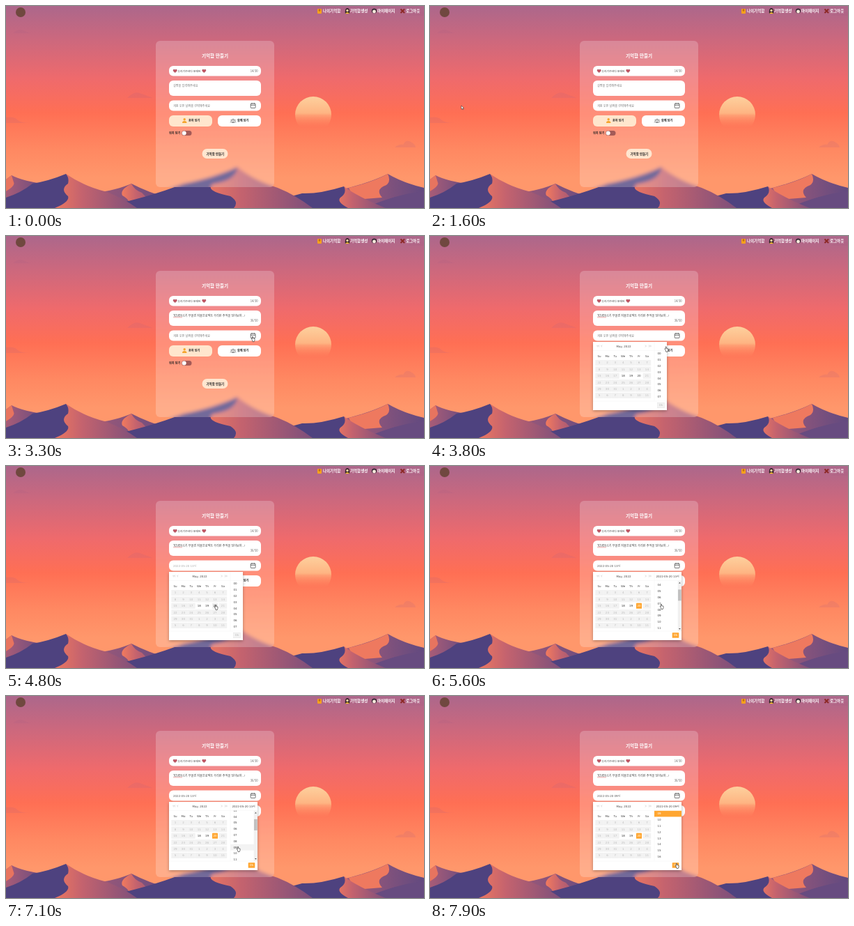
Animation of 600x290 px, one loop 8000 ms. Source, as an HTML page:

```html
<!DOCTYPE html>
<html lang="ko">
<head>
<meta charset="utf-8">
<style>
  html, body { margin: 0; width: 100%; height: 100%; overflow: hidden; }
  svg { display: block; width: 600px; height: 290px; font-family: "Noto Sans CJK KR", "Noto Sans CJK", "Noto Sans CJK JP", sans-serif; }
  text { font-size: 4.15px; fill: #444; white-space: pre; }
  .nav { font-size: 5.5px; font-weight: 700; fill: #fff; }
  .bold { font-weight: 700; fill: #222; }
  .mid { text-anchor: middle; }
  .end { text-anchor: end; fill: #666; }
  .hint { fill: #777; }
  .num { font-family: "DejaVu Sans", "Noto Sans CJK KR", "Noto Sans CJK JP", sans-serif; font-size: 4px; }
</style>
</head>
<body>
<svg viewBox="0 0 600 290">
  <defs>
    <linearGradient id="sky" x2="0" y2="1">
      <stop offset="0" stop-color="#ac678b"/>
      <stop offset=".15" stop-color="#c9687f"/>
      <stop offset=".36" stop-color="#ef6a6c"/>
      <stop offset=".53" stop-color="#ff6f54"/>
      <stop offset=".7" stop-color="#ff8761"/>
      <stop offset=".85" stop-color="#ff976b"/>
    </linearGradient>
    <linearGradient id="sunlight" x2="0" y2="1">
      <stop offset="0" stop-color="#fdd09d"/>
      <stop offset=".45" stop-color="#feb583"/>
      <stop offset=".85" stop-color="#ff8a62" stop-opacity="0"/>
    </linearGradient>
    <linearGradient id="lit">
      <stop offset="0" stop-color="#f27a5e"/>
      <stop offset=".35" stop-color="#c5636e"/>
      <stop offset="1" stop-color="#7d4f7b"/>
    </linearGradient>
    <linearGradient id="dusk">
      <stop offset="0" stop-color="#a95c77"/>
      <stop offset="1" stop-color="#624a80"/>
    </linearGradient>
    <filter id="blur" x="0" y="0" width="1" height="1"><feGaussianBlur stdDeviation="2.5"/></filter>
    <filter id="shadow"><feDropShadow dx="0" dy="1.5" stdDeviation="2" flood-opacity=".3"/></filter>
    <clipPath id="card"><rect x="215" y="50" width="170" height="210" rx="6"/></clipPath>
    <clipPath id="hours"><rect x="322" y="164.5" width="39" height="72.5"/></clipPath>
    <path id="heart" d="M0 2.6C-4.4 0-2.5-3.2 0-1.3C2.5-3.2 4.4 0 0 2.6Z" fill="#c25462" stroke="#99404f" stroke-width=".4"/>
    <path id="arrow" d="M0 0V5.2L1.2 4.1 2 5.9 2.8 5.5 2 3.8H3.7Z" fill="#fff" stroke="#222" stroke-width=".5"/>
    <path id="hand" d="M-.7 5L-2 3.6-1.2 3-.6 3.6V.5Q0-.4.6.5V2.6L3 3.2V5.5L2.2 7.6H0Z" fill="#fff" stroke="#222" stroke-width=".6"/>
  </defs>

  <g id="bg">
    <rect width="600" height="290" fill="url(#sky)"/>
    <g fill="#a85c86" opacity=".14">
      <path d="M0 160Q12 158 16 163T36 168H0Z"/>
      <path d="M10 39Q18 32 25 35T36 39Z"/>
      <path d="M174 132Q184 122 192 125T211 132Z"/>
      <path d="M558 203Q564 198 570 199 574 191 581 195T588 203Z"/>
      <path d="M576 14Q588 5 600 9V14Z"/>
    </g>
    <circle cx="441" cy="156" r="26" fill="url(#sunlight)"/>
    <path id="stripes" stroke="#ff7859" stroke-width=".6" opacity=".35"/>
    <!-- far right dune -->
    <path d="M548 241Q522 254 480 264V290H600V261Q570 254 548 241Z" fill="url(#dusk)"/>
    <path d="M548 241Q526 253 492 261L500 278 540 275Q529 263 546 257 553 252 548 241Z" fill="#ee795f"/>
    <path d="M600 266Q560 270 515 290H600Z" fill="#674b80"/>
    <!-- near right dune -->
    <path d="M485 259Q505 274 545 290H470Z" fill="url(#lit)"/>
    <path d="M485 259Q450 270 425 269L385 280V290H491Q474 281 480 275 490 268 485 259Z" fill="#4e427f"/>
    <!-- small left dunes -->
    <path d="M8 243Q25 252 60 256L40 275H0V249Z" fill="url(#dusk)"/>
    <path d="M8 243L0 249V266Q14 258 11 253Z" fill="#e8745f"/>
    <path d="M180 255Q160 264 125 269L100 290H250L232 275Q205 268 180 255Z" fill="url(#dusk)"/>
    <path d="M180 255Q163 264 167 272 183 281 172 290H225Q205 280 195 268 184 264 180 255Z" fill="url(#lit)"/>
    <!-- centre dune -->
    <path d="M332 231Q355 250 390 261 415 271 440 290H280L290 256Z" fill="url(#lit)"/>
    <path d="M332 231Q300 246 255 255 205 275 132 290H327Q335 281 322 273 284 265 297 256 332 250 332 231Z" fill="#4e427f"/>
    <!-- big left dune -->
    <path d="M86 241Q112 259 145 267 170 277 188 290H65Z" fill="url(#lit)"/>
    <path d="M86 241Q62 251 38 255 22 268 0 275V290H70Q92 281 89 273 77 263 89 255 91 247 86 241Z" fill="#4e427f"/>
  </g>

  <g clip-path="url(#card)">
    <use href="#bg" filter="url(#blur)"/>
    <rect x="215" y="50" width="170" height="210" fill="#fff" opacity=".21"/>
  </g>

  <circle cx="21" cy="9" r="7" fill="#70483f"/>
  <g>
    <rect x="447" y="4" width="6" height="7" rx="1" fill="#f7a11c"/>
    <path d="M448.5 6H451.5M450 4V8" stroke="#97520f" stroke-width=".7"/>
    <path d="M487 11Q486 3 490 3T493 11Z" fill="#33252c"/>
    <circle cx="490" cy="6.5" r="1.7" fill="#ffd2a4"/>
    <path d="M487 11Q490 7 493 11Z" fill="#f3bd2c"/>
    <circle cx="528.5" cy="7" r="3.6" fill="#352a35"/>
    <ellipse cx="528.5" cy="8" rx="2.5" ry="2.4" fill="#ffe9dc"/>
    <path d="M566.5 4.5L572 10M572 4.5L566.5 10" stroke="#8d2926" stroke-width="2"/>
    <text class="nav" x="455" y="9">나의기억함</text>
    <text class="nav" x="494" y="9">기억함생성</text>
    <text class="nav" x="533" y="9">마이페이지</text>
    <text class="nav" x="574" y="9">로그아웃</text>
  </g>

  <text class="nav mid" x="300" y="74" style="font-size:6.6px;font-weight:900">기억함 만들기</text>
  <g fill="#fff">
    <rect x="234" y="86" width="132" height="14.5" rx="6"/>
    <rect x="234" y="107" width="132" height="22" rx="6"/>
    <rect x="234" y="135.5" width="132" height="15" rx="6"/>
    <rect x="234" y="157" width="62" height="16" rx="6" fill="#ffe6cd"/>
    <rect x="304" y="157" width="62" height="16" rx="6"/>
    <rect x="281.5" y="205" width="37" height="14" rx="7" fill="#ffe6d0"/>
    <rect x="252" y="179" width="14.5" height="7" rx="3.5" fill="#a45a57"/>
    <circle cx="255.7" cy="182.5" r="3"/>
  </g>
  <use href="#heart" x="242.7" y="93"/>
  <use href="#heart" x="284.3" y="93"/>
  <text x="246.3" y="94.8" style="font-size:3.9px">우리기수바다 포레버</text>
  <text class="end" x="361.5" y="95">14/30</text>
  <g fill="none" stroke="#555" stroke-width=".8">
    <rect x="351.2" y="140" width="6.8" height="6.4" rx=".6"/>
    <path d="M351 142.3H358M353 139V141M356.2 139V141"/>
  </g>
  <g fill="#f6a52c">
    <circle cx="256.2" cy="162.8" r="1.7"/>
    <path d="M253 168Q253 165 256.2 165T259.5 168Z"/>
  </g>
  <g fill="none" stroke="#555" stroke-width=".7">
    <circle cx="326" cy="163.3" r="1.1"/><circle cx="323.4" cy="164" r=".6"/><circle cx="328.6" cy="164" r=".6"/>
    <path d="M324 167.3Q326 164.5 328 167.3ZM322 167.2Q322.5 165.6 324 166M330 167.2Q329.5 165.6 328 166"/>
  </g>
  <text class="bold" x="262" y="166">혼자 담기</text>
  <text class="bold" x="332" y="166">함께 담기</text>
  <text class="bold" x="234" y="184">위치 담기</text>
  <text class="bold mid" x="300.3" y="213.7" style="font-size:4.4px">기억함 만들기</text>

  <g id="live"></g>
</svg>
<script>
const LOOP = 8000, ROW = 8.8, ORANGE = '#ffa630';
const PASTE = 2600, OPEN = 3600, HOVER = 4600, PICK = 5000, HOUR = 7200;
const live = document.getElementById('live');

// Each point is time followed by values; the motion eases between points.
const cursorPath = [[1600, 45, 143], [1800, 45, 143], [2400, 285, 118], [2600, 285, 118], [3300, 354, 144],
  [3500, 354, 144], [4300, 306, 190], [4800, 301, 199], [5000, 301, 199], [5300, 332, 198],
  [5900, 332, 198], [6800, 333, 216], [7200, 333, 216], [7750, 354, 240]];
const scrollPath = [[PICK, 0], [5200, 13 * ROW], [5300, 13 * ROW], [5600, 33.2], [5800, 31],
  [HOUR, 31], [7400, 9 * ROW]];

function along(path, t) {
  const i = path.findIndex(p => p[0] > t);
  if (i < 0) return path.at(-1).slice(1);
  if (!i) return path[0].slice(1);
  const [a, b] = [path[i - 1], path[i]];
  const u = (t - a[0]) / (b[0] - a[0]), k = u * u * (3 - 2 * u);
  return a.slice(1).map((v, j) => v + (b[j + 1] - v) * k);
}

const text = (x, y, s, cls = '', fill = '') =>
  `<text x="${x}" y="${y}" class="${cls}"${fill && ` style="fill:${fill}"`}>${s}</text>`;
const box = (x, y, w, h, fill, more = '') =>
  `<rect x="${x}" y="${y}" width="${w}" height="${h}" fill="${fill}" ${more}/>`;
const line = (d, color) => `<path d="${d}" fill="none" stroke="${color}" stroke-width=".5"/>`;
const pad = n => String(n).padStart(2, '0');

function days(t) {
  let out = '';
  for (let i = 0; i < 42; i++) {
    const col = i % 7, x = 243 + col * 11.4, y = 182 + Math.floor(i / 7) * 9.4;
    const day = i % 31 + 1, free = i > 16 && i < 20, target = i === 19;
    const picked = target && t >= PICK;
    if (!free) out += box(x - 5.7, y - 4, 11.5, 8, '#f2f2f2');
    else if (picked) out += box(x - 4, y - 4, 8, 8, ORANGE, 'rx=".6"');
    else if (target && t >= HOVER) out += box(x - 4, y - 4, 8, 8, '#eee', 'rx=".6"');
    out += text(x, y + 1.4, day, 'num mid', picked ? '#fff' : free ? '#333' : '#bbb');
  }
  return out;
}

function hours(t, wide) {
  const scroll = along(scrollPath, t)[0];
  const chosen = t >= HOUR ? 9 : t >= PICK ? 13 : -1;
  const bar = t >= 5300 && t < 7500;
  let out = '';
  for (let h = 0; h < 24; h++) {
    const y = 169 + h * ROW - scroll;
    if (h === chosen) out += box(322, y - 4.4, wide ? 39 : 18, ROW, ORANGE);
    else if (h === 9 && t >= 6600) out += box(322, y - 4.4, 34, ROW, '#f3f3f3');
    out += text(326.5, y + 1.4, pad(h), 'num', h === chosen ? '#fff' : '');
  }
  if (bar) out += box(355.7, 164.5, 5.3, 72.5, '#f1f1f1') +
    box(356, 170 + scroll * 61 / 275, 4.7, 16, '#c1c1c1') +
    '<path d="M357 168.5H359.8L358.4 166.7ZM357 233H359.8L358.4 234.8Z" fill="#555"/>';
  return `<g clip-path="url(#hours)">${out}</g>`;
}

function popup(t, stamp) {
  const wide = t >= PICK, w = wide ? 127 : 106, right = 234 + w;
  const k = Math.min(1, (t - OPEN) / 200);
  let out = box(234, 152, w, 98, '#fff', 'filter="url(#shadow)"');
  out += line(`M322 152V237M234 164.5H${right}M234 237H${right}`, '#f2f2f2');
  out += line('M241 156.6L239.6 158 241 159.4M243 156.6L241.6 158 243 159.4M247 156.6L245.6 158 247 159.4' +
    'M309 156.6L310.4 158 309 159.4M314 156.6L315.4 158 314 159.4M316 156.6L317.4 158 316 159.4', '#aaa');
  out += text(278, 159.5, 'May, 2022', 'num mid');
  'Su Mo Tu We Th Fr Sa'.split(' ').forEach((d, i) => out += text(243 + i * 11.4, 173.6, d, 'num mid'));
  out += days(t) + hours(t, wide);
  if (wide) out += text(324.5, 159.5, stamp, 'num');
  out += box(right - 13.3, 239.2, 9.6, 7.6, wide ? ORANGE : '#f3f3f3', wide ? 'rx=".6"' : 'stroke="#ddd" stroke-width=".4"');
  out += text(right - 8.5, 244.4, 'Ok', 'num mid', wide ? '#fff' : '#bbb');
  return `<g opacity="${k}" transform="translate(0 ${152 * (1 - k) * .2}) scale(1 ${.8 + .2 * k})">${out}</g>`;
}

function draw(t) {
  const stamp = `2022-05-20 ${t >= HOUR ? '09' : '13'}시`;
  let out = '';
  if (t < PASTE) out += text(240, 115.5, '설명을 입력해주세요', 'hint');
  else out += text(240, 115.5, 'TOVEN 6기 부울경 자율프로젝트 우리반 추억을 담아보자...!') +
    line('M240 116.8H253', '#e25b5b') + text(361.5, 123, '36/50', 'end');
  out += t < HOVER ? text(240, 144.6, '개봉 오픈 날짜를 선택해주세요', 'hint')
    : text(240, 144.6, stamp, 'num', t < PICK ? '#aaa' : '#555');
  if (t >= OPEN) out += popup(t, stamp);
  if (t >= 1600) {
    const [x, y] = along(cursorPath, t);
    out += `<use href="#${t < 3200 ? 'arrow' : 'hand'}" x="${x}" y="${y}"/>`;
  }
  live.innerHTML = out;
}

let stripes = '';
for (let y = 157; y < 175; y += 2.5) {
  const half = Math.sqrt(26 ** 2 - (y - 156) ** 2);
  stripes += `M${441 - half} ${y}H${441 + half}`;
}
document.getElementById('stripes').setAttribute('d', stripes);

const start = performance.now();
function tick() {
  draw((performance.now() - start) % LOOP);
  requestAnimationFrame(tick);
}
tick();
</script>
</body>
</html>
```
